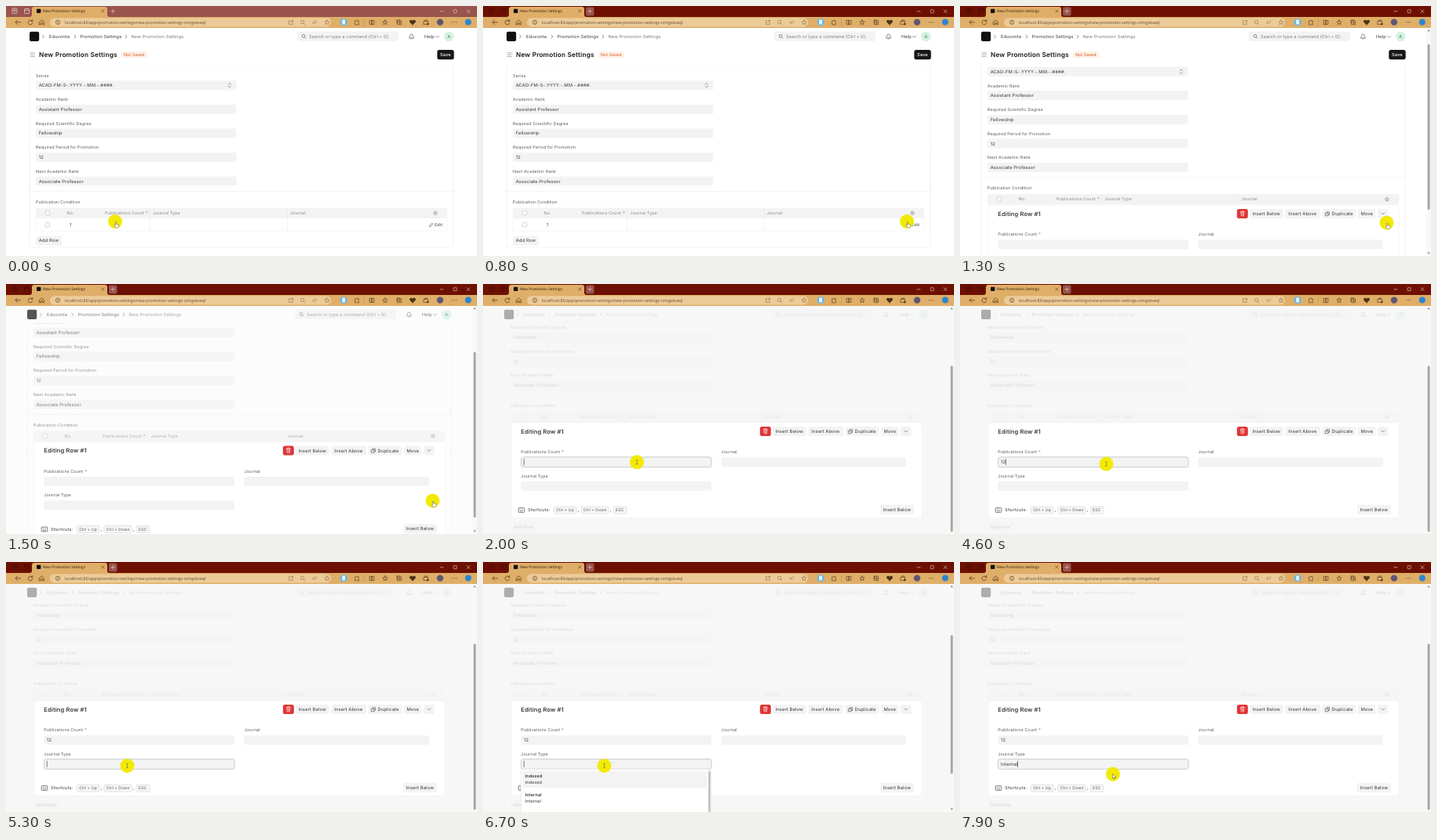
An HTML page for the animation above (8 s loop, 600 by 319 pixels).

```html
<!DOCTYPE html>
<html lang="en">
<head>
<meta charset="utf-8">
<title>New Promotion Settings</title>
<style>
html, body { margin: 0; width: 100%; height: 100%; overflow: hidden; background: #fff; }
svg { display: block; width: 600px; height: 319px; }
text { font-family: Inter, "Noto Sans", sans-serif; letter-spacing: .02em; white-space: pre; text-rendering: geometricPrecision; }
.ui { font-family: "Open Sans", "Noto Sans", sans-serif; letter-spacing: 0; }
</style>
</head>
<body>
<svg id="stage" viewBox="0 0 600 319"></svg>
<script>
const LOOP = 8000, SCROLL = 94.5;
const INK = '#383838', LABEL = '#5a5a5a', GRAY = '#8a8a8a', FIELD = '#f3f3f3', LINE = '#ececec';

// Drawing helpers; the y of a text is its middle.
const rect = (x, y, w, h, fill, r = 0, more = '') =>
  `<rect x="${x}" y="${y}" width="${w}" height="${h}" rx="${r}" fill="${fill}" ${more}/>`;
const text = (x, y, s, size = 5.8, fill = INK, weight = 400, more = '') =>
  `<text x="${x}" y="${y + size * .36}" font-size="${size}" fill="${fill}" font-weight="${weight}" ${more}>${s}</text>`;
const path = (d, stroke = INK, w = .7, fill = 'none') =>
  `<path d="${d}" stroke="${stroke}" stroke-width="${w}" fill="${fill}" stroke-linecap="round" stroke-linejoin="round"/>`;
const circle = (x, y, r, fill, more = '') => `<circle cx="${x}" cy="${y}" r="${r}" fill="${fill}" ${more}/>`;
const ring = (x, y, r, stroke, w = .7) => circle(x, y, r, 'none', `stroke="${stroke}" stroke-width="${w}"`);
const group = (id, ...parts) => `<g id="${id}">${parts.join('')}</g>`;

const right = (x, y, c = '#666') => path(`M${x - 1},${y - 2}l2,2l-2,2`, c);
const down = (x, y, c = '#666') => path(`M${x - 2},${y - 1}l2,2l2,-2`, c);
const label = (x, y, s) => text(x, y, s, 5.4, LABEL);
const required = (x, y) => text(x, y, '*', 5.4, '#e25050');
const field = (x, y, w) => rect(x, y - 6, w, 12, FIELD, 2.5);
const check = (x, y) => rect(x - 2.7, y - 2.7, 5.4, 5.4, '#fff', 1.2, 'stroke="#b5b5b5" stroke-width=".6"');
const button = (x, y, w, s, tx = 3.7) => rect(x, y - 6, w, 12, FIELD, 2.5) + text(x + tx, y, s);
const focusRing = (id, y) => `<g id="${id}">` +
  rect(48.5, y - 6.4, 242.5, 12.9, '#f3f3f3', 3, 'stroke="#c0c0c0" stroke-width=".8"') + '</g>';
const star = (x, y, c) => path(`M${x},${y - 3}l.9,2l2.2,.2l-1.7,1.4l.6,2.2l-2,-1.2l-2,1.2l.6,-2.2l-1.7,-1.4l2.2,-.2z`, c, .6);

function toolbar(c, faint) {
  return '<g transform="translate(0 .4)">' + [
    path('M18.5,20.4h-6.5l2.7,-2.7m-2.7,2.7l2.7,2.7', c),
    path('M33.4,18.8a2.9,2.9 0 1 0 .4,2.5m0,-4.2v2h-2', c),
    path('M42.6,20l2.9,-2.6l2.9,2.6v3.2h-2v-2h-1.8v2h-2z', c),
    rect(56, 14.8, 358, 11.2, '#edcb98', 5.5),
    ring(66, 20.4, 2.7, c, .6), path('M66,20v1.7m0,-2.8v.1', c, .6),
    text(75, 20.4, 'localhost:85/app/promotion-settings/new-promotion-settings-rzmgskveql', 5.25, '#5b4a35', 400, 'class="ui"'),
    path('M362,18.2h-1.5v4.8h4.6v-1.6m-1.6,-3.5h2v2m0,-2l-2.7,2.7', faint, .6),
    ring(377.5, 20, 2.2, faint, .6), path('M379.2,21.7l1.8,1.6', faint, .6),
    text(390.5, 20.4, 'A', 5.2, faint, 400, 'class="ui"'), path('M395,18q1.2,1.4 0,3', faint, .6),
    star(409, 20.4, faint),
    rect(425.7, 15.8, 8.8, 8.8, '#69b6e4', 4), rect(428.2, 17.2, 3.8, 6, '#e9f5fb', .8),
    path('M445,18.6h1.3q.8,-2.2 1.6,0h1.5v1.5q-2,.8 0,1.6v1.7h-4.4z', c, .6),
    path('M456.5,16v9', '#b98d51', .5),
    path('M463.5,18h2.7v5h-2.7zM466.2,18h2.7v5h-2.7z', c, .6),
    star(483, 20.4, c),
    path('M499,18.5h4.6v4.7h-4.6zM498,21.5v-4h4m-.7,2v2.6m-1.3,-1.3h2.6', c, .6),
    path('M518,23.3q-6.3,-4.6 -2,-5.7q1.2,0 2,1.2q.8,-1.2 2,-1.2q4.3,1.1 -2,5.7z', c, .8, c),
    path('M532.3,19h5.4v4h-5.4zM533.7,19v-1.5h2.6v1.5', c, .6), circle(537.3, 22.6, 1.3, c),
    circle(553, 20.2, 4.2, '#5e5674'),
    [568.5, 571, 573.5].map(x => circle(x, 20.4, .55, c)).join(''),
    circle(588.8, 20.2, 4, '#2a87cf')].join('') + '</g>';
}

function chrome() {
  const c = '#4a3317', light = '#efd8cc', pale = '#98544d';
  return group('chrome',
    rect(0, 0, 600, 14, '#6d1002'),
    rect(0, 0, 600, 14, pale, 0, 'id="inactive"'),
    '<g id="corner" fill="none" stroke-width=".7">',
    '<circle cx="11" cy="5.8" r="1.2"/><rect x="8" y="3" width="6" height="6.5" rx="1.2"/>',
    '<rect x="23.5" y="3.5" width="6" height="6" rx="1"/><path d="M23.5,5.3h6"/></g>',
    path('M30,14q3,0 3,-3v-7q0,-3 3,-3h90q3,0 3,3v7q0,3 3,3z', 'none', 0, '#dfae68'),
    rect(39, 3.7, 5.4, 5.4, '#111', 1),
    text(47, 6.7, 'New Promotion Settings', 4.8, '#2b1a08', 400, 'class="ui"'),
    path('M121.7,4.9l3.2,3.2m0,-3.2l-3.2,3.2', c, .6),
    rect(131, 1.5, 10.5, 11, pale, 2),
    path('M133.7,6.7h5m-2.5,-2.5v5', light, .6),
    path('M553,6.8h4', light, .6),
    rect(570.2, 4.7, 4, 4, 'none', .5, `stroke="${light}" stroke-width=".6"`),
    path('M587,4.7l4,4m0,-4l-4,4', light, .6),
    rect(0, 14, 600, 14, '#dfae68'),
    toolbar(c, '#8b6d43'));
}

function nav() {
  return group('nav',
    rect(0, 27, 606, 23.5, '#fff'),
    right(47.5, 39), text(55, 39, 'Eduvonta', 5.7, INK),
    right(88, 39), text(94.5, 39, 'Promotion Settings', 5.67, INK),
    right(153, 39), text(159.5, 39, 'New Promotion Settings', 5.67, '#777'),
    rect(371, 32.5, 129, 12.5, FIELD, 3),
    ring(379, 38.4, 1.9, '#666'), path('M380.5,39.9l1.5,1.5', '#666'),
    text(386, 39, 'Search or type a command (Ctrl + G)', 5.6, '#7c7c7c'),
    path('M513.5,40.6q1,-.8 1,-2.6q0,-2 2,-2t2,2q0,1.8 1,2.6zM515.7,41.8h1.6', '#444', .6),
    text(533, 39, 'Help', 5.7, INK), down(549.5, 39.3),
    circle(564.3, 39, 6.3, '#d8f1e1'), text(562.3, 39, 'A', 5.8, '#2c8a57'));
}

function head() {
  return group('head',
    rect(0, 50, 606, 25, '#fff'),
    path('M31,59.8h5.4M31,62.2h5.4M31,64.6h5.4', '#777', .6),
    text(42, 62, 'New Promotion Settings', 8.25, '#171717', 600),
    rect(147, 57.8, 33.3, 8.6, '#fff1e7', 3), text(150, 62, 'Not Saved', 5.25, '#d4551a'),
    rect(549.3, 56, 21.4, 12.2, '#171717', 2.8), text(552.9, 62.1, 'Save', 5.7, '#fff', 500));
}

function form() {
  const rows = [['Series', 'ACAD-FM-S-.YYYY.-.MM.-.####.'], ['Academic Rank', 'Assistant Professor'],
    ['Required Scientific Degree', 'Fellowship'], ['Required Period for Promotion', '12'],
    ['Next Academic Rank', 'Associate Professor']];
  return group('form',
    path('M30,290V77q0,-2 2,-2h536q2,0 2,2V290M30,236.5H570', LINE, .6),
    rows.map(([name, value], i) => {
      const y = 101.2 + 30.6 * i;
      return label(38, y - 12.6, name) + field(38, y, 255.5) + text(41.7, y, value);
    }).join(''),
    path('M283,100.2l1.7,-1.7l1.7,1.7M283,102.3l1.7,1.7l1.7,-1.7', '#555', .6),
    label(38, 250, 'Publication Condition'),
    rect(38, 257.5, 524, 13.5, FIELD, 2),
    check(53, 264), text(77.6, 264, 'No.', 5.4, GRAY),
    text(126, 264, 'Publications Count', 5.4, GRAY), required(178, 264),
    text(187.3, 264, 'Journal Type', 5.4, GRAY), text(361.7, 264, 'Journal', 5.4, GRAY),
    ring(547, 264.2, 2.1, GRAY, .8), circle(547, 264.2, .7, GRAY),
    path('M183.5,258v13M358.5,258v13', '#e6e6e6', .5),
    group('row',
      path('M38,271v14q0,2 2,2h520q2,0 2,-2v-14M183.5,271v16M358.5,271v16', LINE, .6),
      check(53, 279.2), text(80.9, 279.2, '1', 5.6),
      path('M539.5,281.4l.4,-1.6l2.8,-2.8l1.2,1.2l-2.8,2.8z', '#444', .6), text(546, 279.2, 'Edit', 5.4)),
    group('add',
      path('M30,180V306q0,2 2,2h536q2,0 2,-2V180', LINE, .6),
      button(38, 299.4, 33.3, 'Add Row')));
}

function panel() {
  const key = (x, w, s) => rect(x, 284, w, 9, '#f6f6f6', 2, 'stroke="#d4d4d4" stroke-width=".6"') + text(x + 3, 288.6, s, 5.1, LABEL);
  return group('panel',
    rect(35.8, 177, 523.4, 121.3, '#fff', 4, 'stroke="#ededed" stroke-width=".5"'),
    text(48.3, 188.3, 'Editing Row #1', 7.5, INK, 600),
    rect(352.8, 182, 14, 12, '#e03636', 2.8),
    path('M357.2,185.8h5.2M358.7,185.8v-1.2h2.2v1.2M357.8,185.8l.4,5h3.2l.4,-5M359.2,187.5v1.8M360.4,187.5v1.8', '#fff', .6),
    button(368.8, 188, 43, 'Insert Below'), button(414.6, 188, 44.3, 'Insert Above'),
    button(461.6, 188, 42.8, 'Duplicate', 12),
    path('M465.7,187.3h3.4v3.4h-3.4zM467,187.3v-1.6h3.6v3.5h-1.5', '#444', .6),
    button(506.8, 188, 22.3, 'Move'),
    rect(532, 182, 13.6, 12, FIELD, 2.5), down(538.8, 188),
    label(48.3, 214.2, 'Publications Count'), required(100, 214.2),
    field(48.3, 227.2, 242.7), label(303.6, 214.2, 'Journal'), field(303.3, 227.2, 235.7),
    label(48.3, 244.8, 'Journal Type'), field(48.3, 257.8, 242.7),
    focusRing('ring1', 227.2), focusRing('ring2', 257.8),
    text(52, 227.2, '', 5.8, INK, 400, 'id="count"'), text(52, 257.8, '', 5.8, INK, 400, 'id="type"'),
    rect(0, -4, .6, 8, '#222', 0, 'id="caret"'),
    rect(45.2, 285.6, 7.6, 5.8, 'none', 1, 'stroke="#444" stroke-width=".7"'),
    path('M47,287.5h.1m1.7,0h.1m1.7,0h.1M47.5,289.6h3', '#444', .7),
    text(57, 288.4, 'Shortcuts:', 5.6),
    key(90.3, 28.7, 'Ctrl + Up'), text(120.8, 288.4, ','),
    key(124.8, 35.4, 'Ctrl + Down'), text(162, 288.4, ','), key(166, 17, 'ESC'),
    button(506, 287.7, 43, 'Insert Below'));
}

function menu() {
  const item = (y, s) => text(53.6, y, s, 5.5, INK, 600) + text(53.6, y + 8.2, s, 5.5, INK);
  return group('menu',
    rect(48.3, 264.3, 242.4, 60, '#fff', 2, 'stroke="#dedede" stroke-width=".6"'),
    rect(50.3, 266.5, 235, 21.5, FIELD, 2, 'id="hover"'),
    item(273, 'Indexed'), item(297, 'Internal'),
    rect(286.3, 265, 4, 60, '#f4f4f4'), rect(287.2, 267, 2.4, 60, '#bdbdbd', 1));
}

const scrollbar = () => group('bar',
  rect(594, 27, 6, 292, '#f8f8f8'),
  path('M595.8,32l1.3,-2l1.3,2z', '#8a8a8a', .3, '#8a8a8a'),
  path('M595.8,314.5l1.3,2l1.3,-2z', '#8a8a8a', .3, '#8a8a8a'),
  rect(595.6, 36, 3, 0, '#a6a6a6', 1.5, 'id="thumb"'));

const pointer = () => group('cursor',
  circle(0, 0, 9, '#f2ea05'),
  group('hand', path('M.4,1v4.2l-1,-.9l-.7,.6l2,3h3.2l.7,-2.2v-1.6l-3.2,-.8v-2.3z', '#555', .5, '#fff')),
  group('beam', path('M-1,-2.8q1,0 1,.6v4.4q0,.6 -1,.6M1,-2.8q-1,0 -1,.6M1,2.8q-1,0 -1,-.6', '#555', .5)),
  group('arrow', path('M-.4,0v5.6l1.3,-1.2l.9,2l.9,-.4l-.9,-2h1.8z', '#444', .5, '#fff')));

stage.innerHTML = group('page', form(), head(), nav()) +
  rect(0, 27, 600, 292, '#f6f6f6', 0, 'id="dim"') +
  rect(30, 32.7, 12.2, 12.2, '#111', 2, 'id="logo"') +
  panel() + menu() + scrollbar() + chrome() + pointer();

const $ = id => document.getElementById(id);
const set = (id, name, value) => $(id).setAttribute(name, value);
const show = (id, on) => set(id, 'visibility', on ? 'visible' : 'hidden');
const move = (id, x, y) => set(id, 'transform', `translate(${x} ${y})`);
const ramp = (t, a, b) => Math.min(1, Math.max(0, (t - a) / (b - a)));
const swing = p => .5 - Math.cos(Math.PI * p) / 2;

// Mouse way: time, x, y
const way = [[0, 139, 275], [400, 139, 275], [800, 540, 275], [1000, 540, 276], [1300, 543.5, 276.5],
  [1500, 543.5, 276.5], [2000, 196, 227.3], [2300, 186.3, 229.6], [4600, 186.3, 229.6], [5200, 154.5, 260],
  [7100, 154.5, 260], [7400, 160, 300], [7500, 160, 300], [7900, 194.8, 270.6], [LOOP, 194.8, 270.6]];

function mouseAt(t) {
  const i = way.findIndex(k => k[0] > t);
  const [a, x, y] = way[i - 1], [b, u, v] = way[i], p = swing(ramp(t, a, b));
  return [x + (u - x) * p, y + (v - y) * p];
}

function caretOn(t) {
  if (t < 3900) return t < 2300 || (t >= 2800 && t < 3300);
  if (t < 5300 || t >= 7500) return true;
  return Math.floor((t - 5300) / 500) % 2 === 0;
}

function draw(now) {
  const t = Math.floor(now % LOOP / 100) * 100;
  const open = t >= 1100, listed = t >= 6700 && t < 7500, second = t >= 5200;
  const scroll = SCROLL * swing(ramp(t, 1150, 1680)), fade = ramp(t, 1350, 1700);
  const shift = open ? -3 : 0;

  set('inactive', 'opacity', 1 - ramp(t, 0, 300));
  set('corner', 'stroke', t < 200 ? '#f3e4de' : '#3d0b05');
  move('page', shift, 0);
  move('logo', shift, 0);
  set('logo', 'opacity', 1 - .68 * fade);
  move('form', 0, -scroll);
  move('add', 0, open ? 105 : 0);
  show('row', !open);
  show('head', scroll < 30);
  set('dim', 'opacity', .83 * fade);

  move('panel', 0, SCROLL - scroll);
  set('panel', 'display', open ? 'inline' : 'none');
  const count = t < 4000 ? '' : t < 4200 ? '1' : '12', type = t < 7500 ? '' : 'Internal';
  $('count').textContent = count;
  $('type').textContent = type;
  set('ring1', 'opacity', t >= 1600 && !second ? 1 : 0);
  set('ring2', 'opacity', second ? 1 : 0);
  const active = $(second ? 'type' : 'count');
  const end = active.textContent ? active.getComputedTextLength() : 0;
  move('caret', 51.8 + end, second ? 257.8 : 227.2);
  set('caret', 'opacity', t >= 1600 && caretOn(t) ? 1 : 0);

  set('menu', 'display', listed ? 'inline' : 'none');
  set('hover', 'y', t < 7400 ? 266.5 : 290.5);

  const tall = listed ? 449 : 376;
  set('bar', 'display', open ? 'inline' : 'none');
  set('thumb', 'y', 36 + scroll / tall * 272);
  set('thumb', 'height', 292 / tall * 272);

  move('cursor', ...mouseAt(t));
  const beam = t >= 1900 && t < 7300, arrow = t >= 7600 || (t >= 1600 && t < 1900);
  show('beam', beam);
  show('arrow', arrow);
  show('hand', !beam && !arrow);
  requestAnimationFrame(draw);
}
requestAnimationFrame(draw);
</script>
</body>
</html>
```
